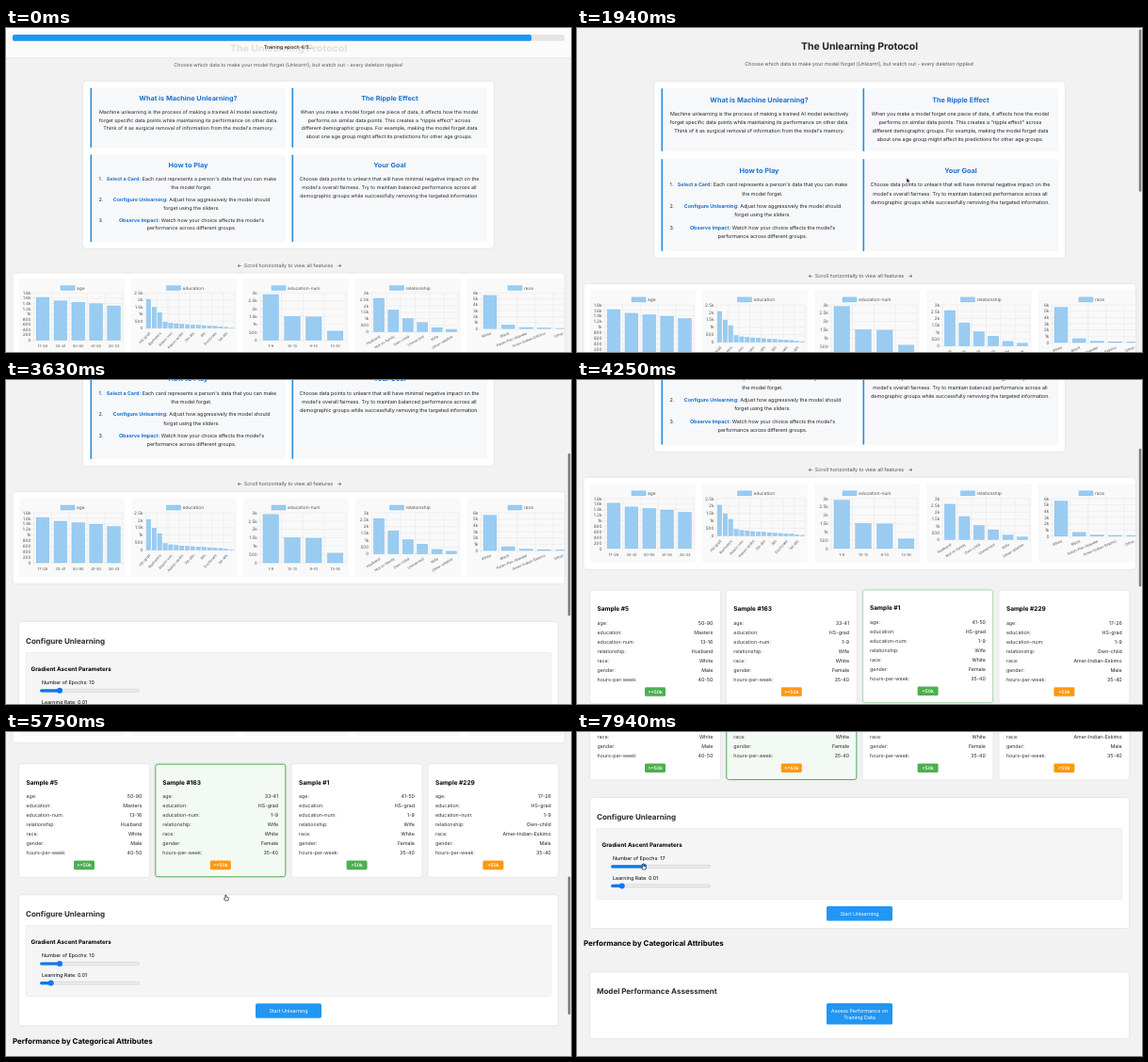
Write an HTML page that moves like this. It is 600 px wide and 344 px high and loops after 8000 ms.

```html
<!DOCTYPE html>
<html lang="en">
<head>
<meta charset="utf-8">
<title>Unlearning page</title>
<style>
html, body { margin: 0; width: 600px; height: 344px; overflow: hidden; background: #f2f2f2; }
svg { display: block; }
text { font-family: Inter, Roboto, sans-serif; text-rendering: geometricPrecision; white-space: pre; }
.card { filter: drop-shadow(0 .8px 1.2px rgba(0, 0, 0, .1)); }
.key { fill: #1670d0; font-weight: 700; }
</style>
</head>
<body>
<svg id="svg" width="600" height="344" viewBox="0 0 600 344"></svg>
<script>
const LOOP = 8000, VIEW = 344, SAMPLE_SPACE = 121, SAMPLES_AT = 4100, SELECT_AT = 5250;

// Markup helpers; the y of a text is the middle of its capitals.
const text = (x, y, s, { size = 5.37, fill = '#222', weight = 400, anchor = 'start', turn = 0, id = '' } = {}) =>
  `<text ${id && `id="${id}"`} x="${x}" y="${y + size * 0.36}" font-size="${size}" fill="${fill}" font-weight="${weight}"
    text-anchor="${anchor}" ${turn ? `transform="rotate(${turn} ${x} ${y})"` : ''}>${s}</text>`;
const mid = (x, y, s, o) => text(x, y, s, { anchor: 'middle', ...o });
const bold = (x, y, s, size, fill = '#000') => text(x, y, s, { size, fill, weight: 700 });
const rect = (x, y, w, h, fill, r = 0, more = '') =>
  `<rect x="${x}" y="${y}" width="${w}" height="${h}" rx="${r}" fill="${fill}" ${more}/>`;
const card = (x, y, w, h, r = 2.5, more = '') => rect(x, y, w, h, '#fff', r, `class="card" ${more}`);
const lines = (x, y, list) => list.map((s, i) => mid(x, y + i * 9.2, s)).join('');

function infoCard(x, y, h, title, body) {
  return rect(x, y, 207.5, h, '#f7f8fa', 2) + rect(x, y, 1.6, h, '#2b8bdc', 0.8) +
    mid(x + 104, y + 12.1, title, { size: 7.3, fill: '#1670d0', weight: 700 }) + body;
}

function intro() {
  const key = s => `<tspan class="key">${s}</tspan>`;
  const steps = [
    [key('Select a Card:') + ' Each card represents a person\'s data that you can make', 'the model forget.'],
    [key('Configure Unlearning:') + ' Adjust how aggressively the model should', 'forget using the sliders.'],
    [key('Observe Impact:') + ' Watch how your choice affects the model\'s', 'performance across different groups.']
  ].map((pair, i) => text(98.5, 169.6 + i * 22.8, i + 1 + '.') + lines(197, 169.6 + i * 22.8, pair)).join('');
  return mid(300, 22.3, 'The Unlearning Protocol', { size: 10.5, weight: 700 }) +
    mid(300, 41.2, 'Choose which data to make your model forget (<tspan font-style="italic">Unlearn!</tspan>), but watch out - every deletion ripples!', { fill: '#555' }) +
    card(82, 60, 436, 187, 4) +
    infoCard(89.5, 67, 67, 'What is Machine Unlearning?', lines(193.7, 94, [
      'Machine unlearning is the process of making a trained AI model selectively',
      'forget specific data points while maintaining its performance on other data.',
      'Think of it as surgical removal of information from the model\'s memory.'])) +
    infoCard(303.5, 67, 67, 'The Ripple Effect', lines(407, 94, [
      'When you make a model forget one piece of data, it affects how the model',
      'performs on similar data points. This creates a "ripple effect" across',
      'different demographic groups. For example, making the model forget data',
      'about one age group might affect its predictions for other age groups.'])) +
    infoCard(89.5, 142, 98, 'How to Play', steps) +
    infoCard(303.5, 142, 98, 'Your Goal', lines(407, 169.6, [
      'Choose data points to unlearn that will have minimal negative impact on the',
      'model\'s overall fairness. Try to maintain balanced performance across all',
      'demographic groups while successfully removing the targeted information.'])) +
    mid(300, 266.5, 'Scroll horizontally to view all features', { fill: '#555' }) +
    mid(248, 266.5, '←') + mid(354, 266.5, '→');
}

const charts = [
  { name: 'age', key: 58, left: 29.5, right: 124, base: 350, max: 1800, step: 200,
    bars: [.905, .83, .8, .77, .725], labels: ['17-26', '33-41', '50-90', '41-50', '26-33'] },
  { name: 'education', key: 170.5, left: 148.5, right: 242.5, base: 336.5, max: 2500, step: 500, turn: -48, every: 2,
    bars: [.82, .59, .44, .17, .14, .125, .11, .1, .09, .08, .07, .06, .05, .04, .02, .01],
    labels: ['HS-grad', 'Bachelors', 'Assoc-voc', 'Assoc-acdm', '7th-8th', '9th', 'Doctorate', '1st-4th'] },
  { name: 'education-num', key: 282, left: 269.8, right: 361, base: 350, max: 3000, step: 500,
    bars: [.965, .5, .49, .19], labels: ['1-9', '10-13', '9-10', '13-16'] },
  { name: 'relationship', key: 407.5, left: 388.3, right: 480.7, base: 340.5, max: 3000, step: 500, turn: -32,
    bars: [.86, .56, .34, .235, .105, .06],
    labels: ['Husband', 'Not-in-family', 'Own-child', 'Unmarried', 'Wife', 'Other-relative'] },
  { name: 'race', key: 533, left: 504.4, right: 600.4, base: 337, max: 6000, step: 1000, turn: -23,
    bars: [.93, .1, .03, .02, .005],
    labels: ['White', 'Black', 'Asian-Pac-Islander', 'Amer-Indian-Eskimo', 'Other'] }
];

function chart({ name, key, left, right, base, max, step, bars, labels, turn = 0, every = 1 }, i) {
  const top = 297, h = base - top, pitch = (right - left) / bars.length;
  const bar = 'stroke="#6cb7ee" stroke-width=".4"', blue = '#9accf2';
  let grid = '', out = rect(14 + i * 119, 281, 112, 84, '#f9f9f9', 2);
  for (let v = 0; v <= max; v += step) {
    const y = base - h * v / max;
    grid += `M${left - 2} ${y}H${right}`;
    out += text(left - 3, y, v < 1000 ? v : v / 1000 + 'k', { size: 4.7, fill: '#555', anchor: 'end' });
  }
  for (let n = 0; n <= bars.length; n += every) grid += `M${left + n * pitch} ${top}V${base + 2}`;
  out += `<path d="${grid}" stroke="#e0e0e0" stroke-width=".4"/>`;
  bars.forEach((v, n) => out += rect(left + pitch * (n + .14), base - h * v, pitch * .72, h * v, blue, 0, bar));
  labels.forEach((s, n) => {
    const x = left + pitch * (n * every + .5);
    out += turn ? text(x + 1, base + 5, s, { size: 3.9, fill: '#555', anchor: 'end', turn })
                : mid(x, base + 6.5, s, { size: 4, fill: '#555' });
  });
  return out + rect(key, 289, 15, 5, blue, 0, bar) + text(key + 17, 291.5, name, { size: 4.8, fill: '#555' });
}

const fields = ['age', 'education', 'education-num', 'relationship', 'race', 'gender', 'hours-per-week'];
const samples = [
  [5, '50-90', 'Masters', '13-16', 'Husband', 'White', 'Male', '40-50', '>=50k'],
  [163, '33-41', 'HS-grad', '1-9', 'Wife', 'White', 'Female', '35-40', '>=50k'],
  [1, '41-50', 'HS-grad', '1-9', 'Wife', 'White', 'Female', '35-40', '&lt;50k'],
  [229, '17-26', 'HS-grad', '1-9', 'Own-child', 'Amer-Indian-Eskimo', 'Male', '35-40', '&lt;50k']
];

function sample([number, ...values], i) {
  const x = 14 + i * 144.8;
  return `<g id="sample${i}">` + card(x, 395, 138, 119.5) + bold(x + 7.5, 414, 'Sample #' + number, 6.5) +
    fields.map((f, n) => text(x + 7.5, 429 + n * 10, f + ':', { size: 5.3, fill: '#333' }) +
      text(x + 130.3, 429 + n * 10, values[n], { size: 5.3, anchor: 'end' })).join('') +
    rect(x + 58, 497.4, 22, 9.6, i % 2 ? '#ff9810' : '#4caf50', 1.4) +
    mid(x + 69, 502.2, values[7], { size: 4.9, fill: '#fff', weight: 600 }) + '</g>';
}

const slider = (y, x, id) =>
  rect(36.3, y - 1.4, 105, 2.8, '#efefef', 1.4, 'stroke="#b8b8b8" stroke-width=".5"') +
  rect(36.1, y - 1.6, x - 36, 3.2, '#0b78f0', 1.6, `id="${id}Fill"`) +
  `<circle id="${id}Thumb" cx="${x}" cy="${y}" r="3" fill="#0b78f0"/>`;

function button(y, h, ...rows) {
  return rect(265, y, 70, h, '#2196f3', 1.6) + rows.map((s, i) =>
    mid(300, y + h / 2 + (i - (rows.length - 1) / 2) * 7, s, { fill: '#fff' })).join('');
}

const controls = () =>
  card(14, 534, 572, 138) + bold(21, 554, 'Configure Unlearning', 8, '#2b2b2b') +
  rect(21.2, 566.3, 557.6, 75, '#f5f5f5', 2, 'stroke="#ddd" stroke-width=".5"') +
  bold(26.5, 583.6, 'Gradient Ascent Parameters', 6.2) +
  text(38, 598, '', { id: 'epochs', fill: '#000' }) + slider(606.8, 57, 'epoch') +
  text(38, 618.6, 'Learning Rate: 0.01', { fill: '#000' }) + slider(627.4, 47.7, 'rate') +
  button(649, 15.5, 'Start Unlearning') +
  bold(7, 688.6, 'Performance by Categorical Attributes', 7.9) +
  card(14, 719.5, 572, 69.5) + bold(21, 739.6, 'Model Performance Assessment', 8, '#2b2b2b') +
  button(752, 22.5, 'Assess Performance on', 'Training Data');

svg.innerHTML = `
  <clipPath id="panel"><rect x="7" y="270" width="586" height="110"/></clipPath>
  <g id="stage">
    <g id="page">
      ${intro()}
      ${card(7.5, 275, 585.5, 97, 3)}
      <g clip-path="url(#panel)">${charts.map(chart).join('')}</g>
      <g id="sampleRow">${samples.map(sample).join('')}</g>
      <g id="lower">${controls()}</g>
    </g>
    <g id="header">
      ${rect(0, 0, 600, 33, '#fff', 0, 'class="card" fill-opacity=".86"')}
      ${rect(7, 7.4, 586, 7.2, '#e4e4e4', 2)}
      ${rect(7, 7.4, 551, 7.2, '#2196f3', 2, 'id="progress"')}
      ${mid(300, 21.8, '', { id: 'status', fill: '#000' })}
    </g>
  </g>
  ${rect(596.8, 0, 2.5, 100, '#7d7d7d', 1.2, 'id="bar"')}
  <g id="cursor" stroke-linejoin="round">
    <path id="arrow" d="M0 0V5.4L1.3 4.3L2.2 6.2L3.1 5.8L2.3 3.9H4Z" fill="#111" stroke="#fff" stroke-width=".5"/>
    <path id="hand" d="M-1.2 -2.8Q-.6 -3.4 -.1 -2.8V-.8L2 -.3Q2.6 0 2.4 1.2L1.9 3H-1.2L-2.6 .8Q-2.4 0 -1.2 .7Z" fill="#fff" stroke="#222" stroke-width=".7"/>
  </g>`;

const $ = id => document.getElementById(id);
const set = (id, attrs) => { for (const k in attrs) $(id).setAttribute(k, attrs[k]); };
const show = (id, on) => set(id, { visibility: on ? 'visible' : 'hidden' });

// Eased value at time t from [time, value] points.
function track(t, points) {
  const i = points.findIndex(p => p[0] > t);
  if (i < 0) return points[points.length - 1][1];
  if (i === 0) return points[0][1];
  const [t0, a] = points[i - 1], [t1, b] = points[i], p = (t - t0) / (t1 - t0);
  return a + (b - a) * p * p * (3 - 2 * p);
}

function draw(t) {
  const loaded = t >= SAMPLES_AT;
  const scroll = track(t, [[1850, 0], [2440, 48], [2950, 48], [3600, 156], [4100, 156], [4850, 300], [5400, 300], [6250, 464]]);
  set('stage', { transform: `scale(1 ${track(t, [[60, .947], [810, 1]])})` });
  set('page', { transform: `translate(0 ${-scroll})` });
  set('lower', { transform: `translate(0 ${loaded ? 0 : -SAMPLE_SPACE})` });
  show('sampleRow', loaded);

  show('header', t < 1850);
  set('progress', { width: Math.min(586, 551 + 23 * t / 1630) });
  $('status').textContent = `Training epoch ${t < 800 ? 4 : 5}/5...`;

  const height = 808 - (loaded ? 0 : SAMPLE_SPACE);
  set('bar', { y: scroll / height * VIEW, height: VIEW * VIEW / height,
    opacity: t < 1750 ? 0 : track(t, [[6800, 1], [7100, 0]]) });

  const x = track(t, [[900, 430], [1500, 350], [5000, 350], [5200, 234], [6500, 234], [7150, 57], [7300, 57], [7690, 71]]);
  const y = track(t, [[900, 260], [1500, 159], [5000, 159], [5200, 176], [6500, 176], [7150, 143]]);
  const pointing = t > 5030;
  set('cursor', { transform: `translate(${x} ${y})` });
  show('cursor', t > 900 && (t < 2900 || pointing));
  show('arrow', !pointing && t > 900 && t < 2900);
  show('hand', pointing);

  const hover = loaded && t < 5080;
  set('sample2', { transform: `translate(0 ${hover ? -.8 : 0})` });
  const outline = (id, on, width, color, fill) => {
    const box = $(id).firstElementChild;
    box.setAttribute('stroke', on ? color : 'none');
    box.setAttribute('stroke-width', width);
    box.setAttribute('fill', on ? fill : '#fff');
  };
  outline('sample2', hover, .5, '#6fbf75', '#fff');
  outline('sample1', t >= SELECT_AT, 1, '#55b25a', '#f3faf3');

  const thumb = t < 7200 ? 57 : x;
  set('epochThumb', { cx: thumb });
  set('epochFill', { width: thumb - 36 });
  $('epochs').textContent = 'Number of Epochs: ' + (10 + Math.round((thumb - 57) / 2));
}

const start = performance.now();
function tick() {
  draw((performance.now() - start) % LOOP);
  requestAnimationFrame(tick);
}
tick();
</script>
</body>
</html>
```
